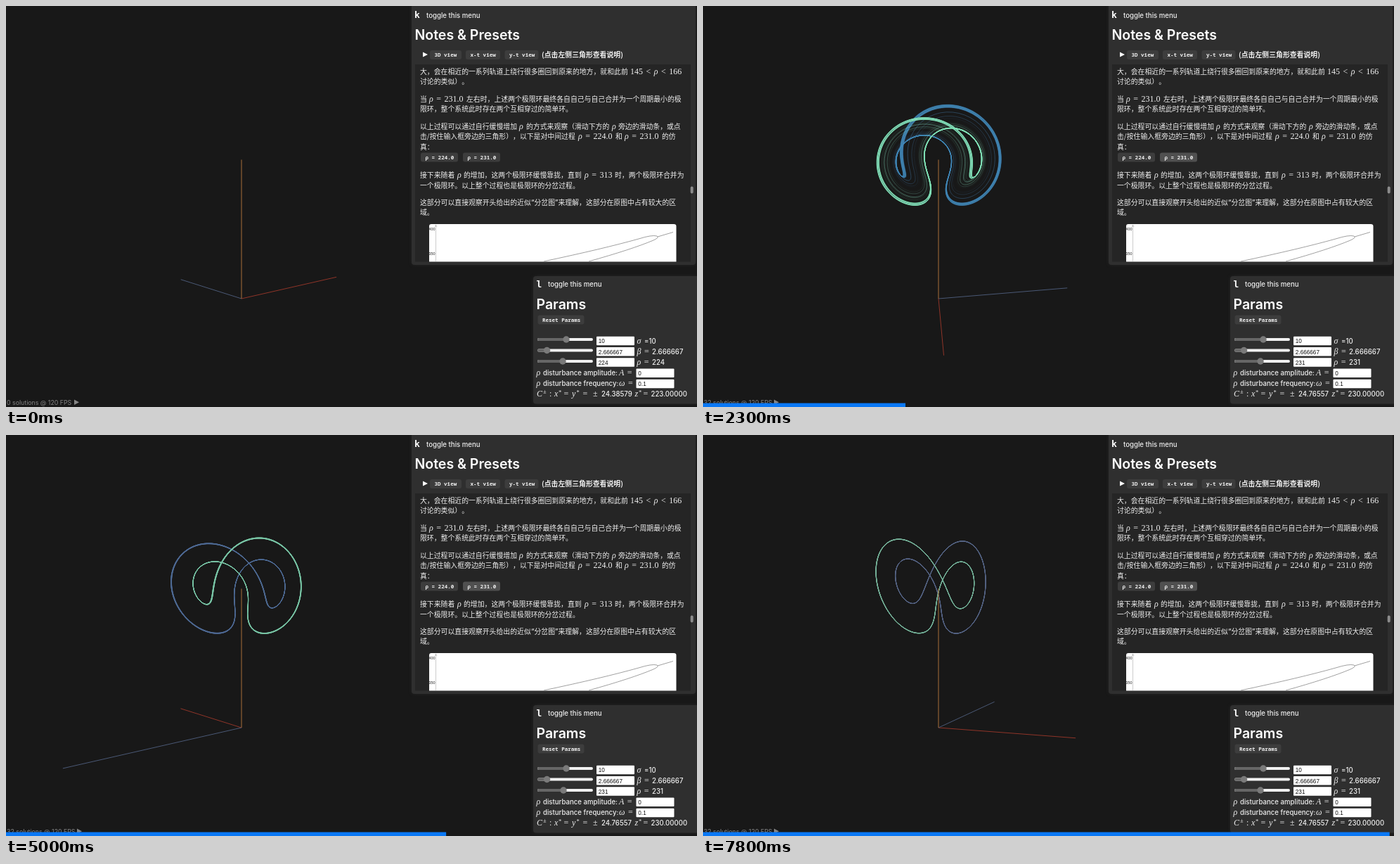
An HTML page with a canvas that plays this animation: 983x570 px, repeating every 7850 ms.

```html
<!DOCTYPE html>
<html lang="zh-CN">
<head>
<meta charset="utf-8">
<title>Lorenz system</title>
<style>
  html, body { margin: 0; width: 100%; height: 100%; overflow: hidden; background: #181818; }
  canvas, svg { position: absolute; left: 0; top: 0; width: 983px; height: 570px; }
  text { fill: #f0f0f0; white-space: pre; }
  .s { font: 500 9.65px Inter, sans-serif; }
  .h { font: 600 19.5px Inter, sans-serif; fill: #fff; }
  .c { font: 9.87px "Noto Sans CJK SC", "Noto Sans CJK", sans-serif; text-spacing-trim: space-all; }
  .w { font-weight: 700; }
  .m { font: 12px "Liberation Serif", serif; word-spacing: 1.5px; }
  .m tspan { font-style: italic; }
  .up { font-size: 8.5px; }
  .k { font: bold 13px "DejaVu Sans Mono", monospace; fill: #fff; }
  .b { font: 600 7.55px "Noto Sans Mono", "DejaVu Sans Mono", monospace; }
  .v { font: 8.2px "Liberation Sans", sans-serif; fill: #111; }
  .f { font: 8.8px Inter, sans-serif; fill: #858585; }
  .t { font: 5.4px "Liberation Sans", sans-serif; fill: #222; }
  .panel { fill: #2f2f2f; filter: drop-shadow(0 0 2px #242424); }
</style>
</head>
<body>
<canvas id="view" width="983" height="570"></canvas>
<svg id="ui" viewBox="0 0 983 570"></svg>
<script>
const startTime = performance.now();
const LOOP = 7850, FRAME = 50, CLICK = 850, HOVER = 700;

// ---------- interface ----------
const ui = document.getElementById('ui');
const text = (cls, x, mid, str, id = '') => {
  const size = { h: 7, k: 4.5, v: 3, b: 2.7, f: 3.2, t: 2 }[cls[0]] || 3.5;
  let body = str.replace(/</g, '&lt;');
  if (cls[0] === 'm') body = body.replace(/[ρσβωACxyz]/g, '<tspan>$&</tspan>');
  return `<text class="${cls}" x="${x}" y="${mid + size}" ${id && `id="${id}"`}>${body}</text>`;
};
const rect = (x, y, w, h, fill, r = 0, extra = '') =>
  `<rect x="${x}" y="${y}" width="${w}" height="${h}" rx="${r}" fill="${fill}" ${extra}/>`;
const button = (x, mid, w, label, id = '') =>
  rect(x, mid - 6.5, w, 13, '#3d3d3d', 3, id && `id="${id}"`) + text('b', x + 6.5, mid, label);
const input = (x, mid, w, value, id) =>
  rect(x, mid - 6.3, w, 12.6, '#fff', 1) + text('v', x + 2.8, mid + .3, value, id);
const slider = (x, y, id = '') =>
  rect(756, y - 2, 79, 4, '#f0f0f0', 2) + rect(756, y - 2, x - 756, 4, '#666', 2) +
  `<circle cx="${x}" cy="${y}" r="4.7" fill="#7a7a7a" ${id && `id="${id}"`}/>`;

const notes = [
  rect(577, -4, 404, 372, '', 4, 'class="panel"'),
  text('k', 581, 12.5, 'k'), text('s', 598, 13, 'toggle this menu'),
  text('h', 581.5, 41, 'Notes &amp; Presets'),
  '<path d="M593 65.5L600 69L593 72.5Z" fill="#fff"/>',
  button(603, 69.5, 45, '3D view'), button(654, 69.5, 49, 'x-t view'), button(709.5, 69.5, 48, 'y-t view'),
  text('c w', 762, 69, '(点击左侧三角形查看说明)'),
  rect(582, 83, 392, 280.5, '#252525'),
  text('c', 589, 93, '大，会在相近的一系列轨道上绕行很多圈回到原来的地方，就和此前'),
  text('m', 888, 93, '145 < ρ < 166'),
  text('c', 589, 107.5, '讨论的类似）。'),
  text('c', 589, 132, '当'), text('m', 602, 132, 'ρ = 231.0'),
  text('c', 655, 132, '左右时，上述两个极限环最终各自自己与自己合并为一个周期最小的极'),
  text('c', 589, 146.5, '限环，整个系统此时存在两个互相穿过的简单环。'),
  text('c', 589, 171, '以上过程可以通过自行缓慢增加'), text('m', 730, 171, 'ρ'),
  text('c', 740, 171, '的方式来观察（滑动下方的'), text('m', 862, 171, 'ρ'),
  text('c', 871, 171, '旁边的滑动条，或点'),
  text('c', 589, 185.5, '击/按住输入框旁边的三角形），以下是对中间过程'),
  text('m', 814, 185.5, 'ρ = 224.0'), text('c', 867, 185.5, '和'),
  text('m', 880, 185.5, 'ρ = 231.0'), text('c', 933, 185.5, '的仿'),
  text('c', 589, 200, '真：'),
  button(590, 215, 53, 'ρ = 224.0'), button(650, 215, 53, 'ρ = 231.0', 'preset'),
  text('c', 589, 240.5, '接下来随着'), text('m', 642, 240.5, 'ρ'),
  text('c', 651, 240.5, '的增加，这两个极限环缓慢靠拢，直到'),
  text('m', 823, 240.5, 'ρ = 313'), text('c', 866, 240.5, '时，两个极限环合并为'),
  text('c', 589, 255, '一个极限环。以上整个过程也是极限环的分岔过程。'),
  text('c', 589, 279.5, '这部分可以直接观察开头给出的近似'), text('s', 747, 279.5, '“'),
  text('c', 751.5, 279.5, '分岔图'), text('s', 781, 279.5, '”'),
  text('c', 785.5, 279.5, '来理解，这部分在原图中占有较大的区'),
  text('c', 589, 293.5, '域。'),
  '<path d="M602 363.5V313Q602 310 605 310H950Q953.5 310 953.5 313V363.5Z" fill="#fff"/>',
  text('t', 601.5, 317, '400'), text('t', 601.5, 352, '350'),
  '<path d="M611.5 311V363M610 314L611.5 311L613 314" fill="none" stroke="#aaa" stroke-width=".6"/>',
  '<path d="M765 363Q850 345 900 331Q919 325 926 327Q930 329 921 333Q890 346 829 363M927 328L949 321.5" fill="none" stroke="#777" stroke-width=".7"/>',
  rect(973.7, 256.5, 4, 10, '#8c8c8c', 2)
];

const params = [
  rect(750, 384, 237, 181.5, '', 4, 'class="panel"'),
  text('k', 754.5, 395, 'l'), text('s', 771, 395.5, 'toggle this menu'),
  text('h', 754.5, 424, 'Params'), button(756.5, 446, 66, 'Reset Params'),
  slider(797, 474), slider(769.5, 489.5), slider(792, 505, 'thumb'),
  input(840, 476, 54, '10'), input(840, 491.3, 54, '2.666667'), input(840, 506.5, 54, '224', 'rhoInput'),
  text('m', 897.5, 476, 'σ'), text('s', 908, 476, '=10'),
  text('m', 897.5, 491, 'β ='), text('s', 919, 491, '2.666667'),
  text('m', 897.5, 506, 'ρ ='), text('s', 919, 506, '224', 'rho'),
  text('m', 754.5, 521, 'ρ'), text('s', 764, 521, 'disturbance amplitude:'),
  text('m', 872, 521, 'A ='), input(896.5, 521.7, 54, '0'),
  text('m', 754.5, 536.5, 'ρ'), text('s', 764, 536.5, 'disturbance frequency:'),
  text('m', 872, 536.5, 'ω ='), input(896.5, 537, 54, '0.1'),
  text('m', 755, 551.5, 'C'), text('m up', 764, 547, '±'), text('m', 773, 551.5, ':'),
  text('m', 780, 551.5, 'x'), text('m up', 786, 548, '*'), text('m', 793.5, 551.5, '='),
  text('m', 805, 551.5, 'y'), text('m up', 811.5, 548, '*'), text('m', 820.5, 551.5, '='),
  text('m', 835, 551.5, '±'), text('s', 847, 551.5, '24.38579', 'fixedXY'),
  text('m', 894.5, 551.5, 'z'), text('m up', 900, 548, '*'),
  text('m', 906.5, 551.5, '='), text('s', 917.5, 551.5, '223.00000', 'fixedZ')
];

const footer = [
  text('f', 1, 563.5, '', 'status'),
  '<path id="play" d="M97 559.5L104 563.2L97 567Z" fill="#858585"/>',
  rect(0, 564.5, 0, 5.5, '#0a78f5', 0, 'id="bar"')
];
ui.innerHTML = [...notes, ...params, ...footer].join('');

const el = id => document.getElementById(id);
const put = (id, str) => { el(id).textContent = str; };
function updateUi(t) {
  const on = t >= CLICK;
  el('bar').setAttribute('width', 983 * t / LOOP);
  el('preset').setAttribute('fill', t >= HOVER ? '#505050' : '#3d3d3d');
  el('thumb').setAttribute('cx', on ? 793 : 792);
  el('play').setAttribute('transform', on ? 'translate(4 0)' : '');
  put('rhoInput', on ? '231' : '224');
  put('rho', on ? '231' : '224');
  put('fixedXY', on ? '24.76557' : '24.38579');
  put('fixedZ', on ? '230.00000' : '223.00000');
  put('status', `${on ? 32 : 0} solutions @ ${on && t < 1700 ? 105 : 120} FPS`);
}

// ---------- Lorenz solutions ----------
const SIGMA = 10, BETA = 8 / 3, RHO = 231;
const H = .003;                        // model time per millisecond
const COUNT = LOOP - CLICK + 1;
const WINDOW = 333;                    // one model time unit, several periods

let seed = 20;
const random = () => (seed = seed * 16807 % 2147483647) / 2147483647;
const spread = r => (random() * 2 - 1) * r;

const flow = (x, y, z) => [SIGMA * (y - x), x * (RHO - z) - y, x * y - BETA * z];
function solve(x, y, z) {
  const out = new Float32Array(3 * COUNT);
  for (let i = 0; i < COUNT; i++) {
    out[3 * i] = x; out[3 * i + 1] = y; out[3 * i + 2] = z;
    const a = flow(x, y, z);
    const b = flow(x + a[0] * H / 2, y + a[1] * H / 2, z + a[2] * H / 2);
    const c = flow(x + b[0] * H / 2, y + b[1] * H / 2, z + b[2] * H / 2);
    const d = flow(x + c[0] * H, y + c[1] * H, z + c[2] * H);
    const next = j => (a[j] + 2 * b[j] + 2 * c[j] + d[j]) * H / 6;
    x += next(0); y += next(1); z += next(2);
  }
  return out;
}

function peak(p, from) {
  let best = from;
  for (let i = from; i < from + WINDOW; i++) if (p[3 * i + 2] > p[3 * best + 2]) best = i;
  return { z: p[3 * best + 2], side: Math.sign(p[3 * best]) };
}

// Half of the solutions end on each of the two mirrored cycles.
const solutions = [];
const SETTLED = 2600 - CLICK;
for (let tries = 0; solutions.length < 32; tries++) {
  const p = solve(spread(60), spread(60), random() * 200);
  const early = peak(p, SETTLED), late = peak(p, COUNT - WINDOW);
  const steady = early.side === late.side && Math.abs(early.z - late.z) < 4;
  if (!steady && tries < 80) continue;
  const side = solutions.length < 16 ? 1 : -1;
  if (late.side !== side)
    for (let i = 0; i < COUNT; i++) { p[3 * i] *= -1; p[3 * i + 1] *= -1; }
  solutions.push({ p, side, tint: random() - .5 });
}

// The lowest point of the cycle lies 134 px above the floor.
let low = Infinity;
for (let i = COUNT - WINDOW; i < COUNT; i++) low = Math.min(low, solutions[0].p[3 * i + 2]);
const SCALE = 134 / low;

// ---------- view ----------
const ctx = el('view').getContext('2d');
const DIST = 490, AXIS = 197.5;
const TURN = [[0, -49.4], [1450, 26.7], [2300, 71], [3000, 110.3], [4150, 174], [5850, 267], [LOOP, 377.3]];
let cos = 1, sin = 0;

function turn(t) {
  const i = TURN.findIndex(k => k[0] > t);
  const [t0, a0] = TURN[i - 1], [t1, a1] = TURN[i];
  const a = (a0 + (a1 - a0) * (t - t0) / (t1 - t0)) * Math.PI / 180;
  cos = Math.cos(a); sin = Math.sin(a);
}
function project(x, y, z) {
  const s = DIST / (DIST - (x * sin - y * cos));
  return [491.5 + (x * cos + y * sin - 156.5) * s, 285 + (131 - z) * s];
}

function axis(x, y, z, color) {
  ctx.strokeStyle = color;
  ctx.lineWidth = 1;
  ctx.beginPath();
  ctx.moveTo(...project(0, 0, 0));
  ctx.lineTo(...project(x, y, z));
  ctx.stroke();
}

const TRAIL = 650, FADE = 320, STEP = 50;
function trail({ p, side, tint }, t) {
  const head = t - CLICK;
  const tail = Math.max(0, head - TRAIL);
  const age = Math.min(1, Math.max(0, (t - 3000) / 3000));
  const mix = (a, b) => a + (b - a) * age;
  ctx.strokeStyle = side < 0
    ? `hsl(${153 + tint * 24} ${mix(60, 28)}% ${mix(69, 58) + tint * 8}%)`
    : `hsl(${mix(207, 224) + tint * 20} ${mix(46, 20)}% ${mix(50, 45) + tint * 8}%)`;
  ctx.lineWidth = mix(.9, .6);
  for (let from = tail; from < head; from += STEP) {
    const to = Math.min(head, from + STEP);
    ctx.globalAlpha = .45 * Math.exp(-(((head - to) / FADE) ** 2));
    ctx.beginPath();
    for (let i = from; i <= to; i++)
      ctx.lineTo(...project(p[3 * i] * SCALE, p[3 * i + 1] * SCALE, p[3 * i + 2] * SCALE));
    ctx.stroke();
  }
  ctx.globalAlpha = 1;
}

function draw(t) {
  turn(t);
  ctx.fillStyle = '#181818';
  ctx.fillRect(0, 0, 983, 570);
  axis(AXIS, 0, 0, '#8f3428');
  axis(0, AXIS, 0, '#4a5875');
  if (t > CLICK) for (const s of solutions) trail(s, t);
  axis(0, 0, AXIS, '#a86f38');
  updateUi(t);
}

let shown = -1;
function tick() {
  const t = Math.floor((performance.now() - startTime) % LOOP / FRAME) * FRAME;
  if (t !== shown) draw(shown = t);
  requestAnimationFrame(tick);
}
tick();
</script>
</body>
</html>
```
